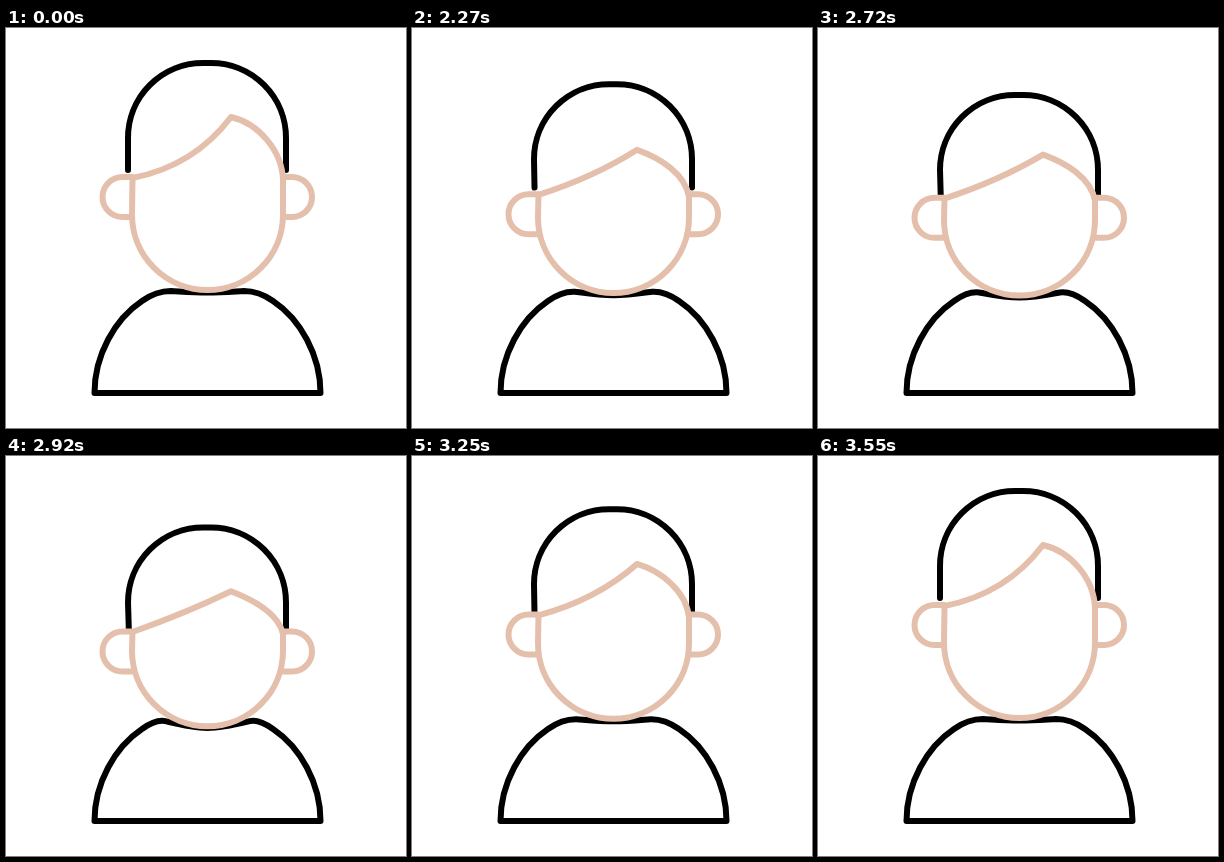
An HTML page for the animation above (3.57 s loop, 400x400 px).

```html
<!DOCTYPE html>
<html lang="en">
<head>
<meta charset="utf-8">
<title>Nodding person</title>
<style>
  html, body { margin: 0; height: 100%; overflow: hidden; background: #fff; }
  svg { display: block; width: 100vw; height: 100vh; }
  path { fill: none; stroke: #000; stroke-width: 6; stroke-linecap: round; stroke-linejoin: round; }
  .skin { stroke: #e4bfab; }
</style>
</head>
<body>
<svg viewBox="0 0 400 400">
  <path id="hair"/>
  <path id="body"/>
  <path id="ears" class="skin"/>
  <path id="face" class="skin"/>
</svg>
<script>
const LOOP = 3570, REST = 2020;

// Keyframes as [ms, amount]; the chin leads, the face tilts after it, the hair lags.
const chinKeys = [[1960, 0], [2100, -.35], [2480, 1], [2530, 1], [2790, .3], [3070, 1], [3100, 1], [3360, -.5], [3550, 0]];
const tiltKeys = [[2040, 0], [2470, 1], [2530, 1], [2800, .5], [3070, 1], [3100, 1], [3350, 0]];
const hairKeys = [[2050, 0], [2480, 1], [2530, 1], [2810, .68], [3070, 1], [3100, 1], [3400, 0]];

const mix = (a, b, k) => a + (b - a) * k;
const ease = u => (1 - Math.cos(Math.PI * u)) / 2;

function sample(keys, t) {
  const next = keys.findIndex(([time]) => time > t);
  if (next < 1) return keys[next ? keys.length - 1 : 0][1];
  const [t0, a] = keys[next - 1], [t1, b] = keys[next];
  return mix(a, b, ease((t - t0) / (t1 - t0)));
}

const setPath = (id, d) => document.getElementById(id).setAttribute('d', d);

function draw(t) {
  if (t < REST) t = 0;
  const chin = sample(chinKeys, t), tilt = sample(tiltKeys, t), hair = sample(hairKeys, t);
  const drop = 13.5 * chin;

  const top = 35 + drop + 35 * hair, hairEnd = 142 + drop + 28 * hair;
  const foot = 1 * hair;
  setPath('hair', `M${122 + foot} ${hairEnd}L122 ${top + 75}A75 75 0 0 1 197 ${top}H205
    A75 75 0 0 1 280 ${top + 75}V${hairEnd}`);

  const neckX = mix(165, 156, chin), neckY = mix(263, 266.5, chin);
  const collar = mix(264.5, 276.5, chin), collarX = mix(175, 170, chin);
  const collarY = mix(263.5, 271, chin);
  setPath('body', `M88.5 365C88.5 327 109 291 136 273Q150 263 ${neckX} ${neckY}
    C${collarX} ${collarY} 187 ${collar} 201.5 ${collar}
    C216 ${collar} ${403 - collarX} ${collarY} ${403 - neckX} ${neckY}
    Q253 263 267 273C294 291 314.5 327 314.5 365Z`);

  const ear = 149 + drop + 25.5 * tilt, inset = 4 * Math.max(0, tilt * 2 - 1);
  setPath('ears', `M126 ${ear}H116.5a20 20 0 0 0 0 40H${126 + inset}
    M277 ${ear}H286a20 20 0 0 1 0 40H${277 - inset}`);

  const jaw = 186.5 + drop, brow = 150 + drop + 25 * tilt, peak = 89 + drop + 53.5 * tilt;
  const partX = mix(188, 178, tilt), partY = 138 + drop + 14.5 * tilt;
  const sideY = brow + 2;
  setPath('face', `M126.5 ${brow}Q${partX} ${partY} 225 ${peak}
    C${mix(252, 246, tilt)} ${peak + mix(99, 160, tilt) / 16} ${mix(276, 271, tilt)} ${mix(peak + 33, peak + 17, tilt)} 277 ${sideY}
    V${jaw}A75.5 75.5 0 0 1 126 ${jaw}Z`);
}

function tick() {
  draw(performance.now() % LOOP);
  requestAnimationFrame(tick);
}
tick();
</script>
</body>
</html>
```
